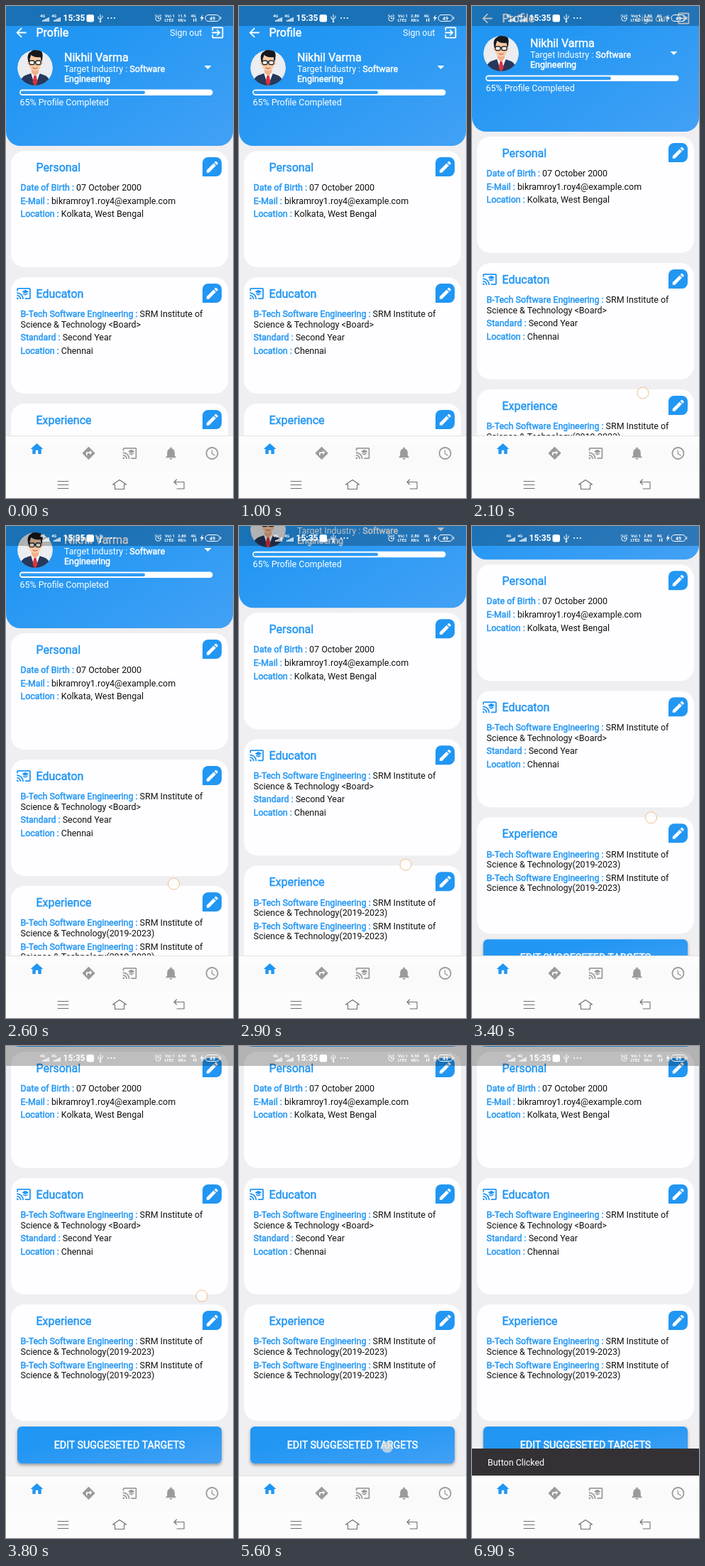
Recreate the animation shown at these times as an HTML page. Size 320 by 693 pixels, loop 7 s.

```html
<!DOCTYPE html>
<html lang="en">
<head>
<meta charset="utf-8">
<title>Profile screen</title>
<style>
html, body { margin: 0; width: 100%; height: 100%; overflow: hidden; background: #efeef0; }
svg { display: block; width: 100vw; height: 100vh; }
text { font: 12.44px Roboto, "Open Sans", sans-serif; fill: #111; white-space: pre; }
.w { fill: #fff; }
.h { font-size: 16px; }
.b { stroke: #2196f3; fill: #2196f3; stroke-width: .45px; }
.w.b, .w .b { stroke: #fff; fill: #fff; }
.tiny { font-size: 5.8px; font-weight: 700; fill: #fff; }
.line { fill: none; stroke-linecap: round; stroke-linejoin: round; }
</style>
</head>
<body>
<svg id="stage" viewBox="0 0 320 693" preserveAspectRatio="none" xmlns="http://www.w3.org/2000/svg"></svg>
<script>
const BLUE = '#2196f3', GREY = '#9b9b9b';
const LOOP = 7000, STEP = 100, MAX_SCROLL = 196, SNACK = 39;

const ICONS = {
  back: 'M20 11H7.83l5.59-5.59L12 4l-8 8 8 8 1.41-1.41L7.83 13H20v-2z',
  exit: 'M10.09 15.59L11.5 17l5-5-5-5-1.41 1.41L12.67 11H3v2h9.67l-2.58 2.59zM19 3H5c-1.11 0-2 .9-2 2v4h2V5h14v14H5v-4H3v4c0 1.1.89 2 2 2h14c1.1 0 2-.9 2-2V5c0-1.1-.9-2-2-2z',
  home: 'M10 20v-6h4v6h5v-8h3L12 3 2 12h3v8z',
  route: 'M21.71 11.29l-9-9c-.39-.39-1.02-.39-1.41 0l-9 9c-.39.39-.39 1.02 0 1.41l9 9c.39.39 1.02.39 1.41 0l9-9c.39-.38.39-1.01 0-1.41zM14 14.5V12h-4v3H8v-4c0-.55.45-1 1-1h5V7.5l3.5 3.5-3.5 3.5z',
  cast: 'M21 3H3c-1.1 0-2 .9-2 2v3h2V5h18v14h-7v2h7c1.1 0 2-.9 2-2V5c0-1.1-.9-2-2-2zM1 18v3h3c0-1.66-1.34-3-3-3zm0-4v2c2.76 0 5 2.24 5 5h2c0-3.87-3.13-7-7-7zm0-4v2c4.97 0 9 4.03 9 9h2c0-6.08-4.93-11-11-11zm10 1.09v2L14.5 15l3.5-1.91v-2L14.5 13 11 11.09zM14.5 6L9 9l5.5 3L20 9l-5.5-3z',
  bell: 'M12 22c1.1 0 2-.9 2-2h-4c0 1.1.89 2 2 2zm6-6v-5c0-3.07-1.64-5.64-4.5-6.32V4c0-.83-.67-1.5-1.5-1.5s-1.5.67-1.5 1.5v.68C7.63 5.36 6 7.92 6 11v5l-2 2v1h16v-1l-2-2z',
  clock: 'M11.99 2C6.47 2 2 6.48 2 12s4.47 10 9.99 10C17.52 22 22 17.52 22 12S17.52 2 11.99 2zM12 20c-4.42 0-8-3.58-8-8s3.58-8 8-8 8 3.58 8 8-3.58 8-8 8zm.5-13H11v6l5.25 3.15.75-1.23-4.5-2.67z',
  pen: 'M3 17.25V21h3.75L17.81 9.94l-3.75-3.75L3 17.25zM20.71 7.04c.39-.39.39-1.02 0-1.41l-2.34-2.34c-.39-.39-1.02-.39-1.41 0l-1.83 1.83 3.75 3.75 1.83-1.83z'
};

const icon = (name, cx, cy, color) =>
  `<path d="${ICONS[name]}" fill="${color}" transform="translate(${cx} ${cy}) scale(.889) translate(-12 -12)"/>`;
const text = (x, y, body, cls = '', more = '') =>
  `<text x="${x}" y="${y}" class="${cls}" ${more}>${body}</text>`;
const bold = s => `<tspan class="b">${s}</tspan>`;
const rect = (x, y, w, h, r, fill, more = '') =>
  `<rect x="${x}" y="${y}" width="${w}" height="${h}" rx="${r}" fill="${fill}" ${more}/>`;

// rows: [offset from the card top, label, value]
function card(top, title, rows, mark) {
  return rect(7, top, 306, 164, 19, '#fefdff') +
    (mark ? icon(mark, 25, top + 23, BLUE) : '') +
    text(42.5, top + 28.5, title, 'h b') +
    `<path d="M285 ${top + 9}h11a8 8 0 0 1 8 8v11a8 8 0 0 1-8 8h-19v-19a8 8 0 0 1 8-8z" fill="${BLUE}"/>` +
    icon('pen', 290.8, top + 22.7, '#fff') +
    rows.map(([dy, label, value]) =>
      text(20.5, top + dy, (label ? bold(label + ' : ') : '') + value)).join('');
}

function avatar() {
  return `<g clip-path="url(#face)">
    <circle cx="41" cy="87" r="25" fill="#ebedf0"/>
    <path d="M19 113q0-14 13-17l9-3 9 3q13 3 13 17z" fill="#26385c"/>
    <path d="M35 94l6 19 7-19-7-4z" fill="#fff"/>
    <path d="M36 86h10v8l-5 5-5-5z" fill="#efb08a"/>
    <path d="M39.5 98h3l2 9-3.500 6-3.500-6z" fill="#d8333f"/>
    <ellipse cx="41" cy="80" rx="9" ry="11.500" fill="#fbc8a2"/>
    <circle cx="31.800" cy="80.500" r="2" fill="#fbc8a2"/><circle cx="50.200" cy="80.500" r="2" fill="#fbc8a2"/>
    <path d="M31.500 79q-3-12 4-15 4-4 10-2 7 1 6 9 0 5-1.500 8l-1.500-7q-8 1-13-3-2 4-2.500 10z" fill="#17181c"/>
    <g fill="#fff" stroke="#222" stroke-width="1.300"><rect x="33" y="77" width="7" height="5.500" rx="2"/><rect x="42" y="77" width="7" height="5.500" rx="2"/><path d="M40 79h2"/></g>
    <path d="M37.500 87q3.500 2.500 7 0" stroke="#b5543f" fill="none"/>
  </g>`;
}

function header() {
  return `<path d="M0 0H320V177a20 20 0 0 1-20 20H20a20 20 0 0 1-20-20z" fill="url(#sky)"/>` +
    icon('back', 21.5, 37.5, '#fff') + text(42.5, 43, 'Profile', 'h w b') +
    text(231, 42, 'Sign out', 'w') + icon('exit', 298.3, 37.5, '#fff') +
    avatar() +
    text(82, 77.5, 'Nikhil Varma', 'h w b') +
    text(82, 92.5, 'Target Industry : ' + bold('Software'), 'w') +
    text(82, 107, bold('Engineering'), 'w') +
    `<path d="M279.500 84h10l-5 5z" fill="#fff"/>` +
    rect(19, 117.5, 272.5, 8.5, 4.2, '#fff') + rect(20.5, 119.5, 175.5, 4.5, 2.2, '#2f9cf3') +
    text(19.5, 139.5, '65% Profile Completed', 'w');
}

const bars = x => text(x, 15.5, '4G', 'tiny') +
  [2, 3, 4, 5, 6].map((h, i) => rect(x + 3 + i * 2.1, 22 - h, 1.4, h, 0, '#fff')).join('');

function statusBar() {
  return rect(0, 0, 320, 28, 0, '#000', 'opacity=".25"') +
    bars(48) + bars(64) +
    text(80.5, 21.2, '15:35', 'w', 'style="font-size:12px;font-weight:600"') +
    rect(113.5, 12, 10.5, 10.5, 2.5, '#fff') +
    `<g class="line" stroke="#fff">
      <path d="M133 12v10M130 15v2q0 1.500 3 2.500M136 14v2q0 1.500-3 2.500"/>
      <circle cx="214.500" cy="17.500" r="3.700"/><path d="M214.500 15.500v2.200h1.800M210 14l2-2M219 14l-2-2"/>
      <rect x="281" y="12.500" width="20" height="9" rx="4.200"/><path d="M302.700 15.500v3"/>
    </g>
    <g fill="#fff"><circle cx="144" cy="17" r="1.100"/><circle cx="148.500" cy="17" r="1.100"/><circle cx="153" cy="17" r="1.100"/>
    <path d="M277.500 12l-4 5.500h2.500l-1.500 4.500 4.500-6h-2.500z"/><circle cx="133" cy="22" r="1.300"/></g>` +
    text(224, 16, 'Vo) 1', 'tiny') + text(223.5, 22.3, 'LTE2', 'tiny') +
    text(248, 16, '', 'tiny', 'id="speed" text-anchor="middle"') +
    text(248, 22.3, 'KB/s', 'tiny', 'text-anchor="middle" style="font-size:5.2px"') +
    text(260.5, 16, '4G', 'tiny') + rect(264, 18, 1.3, 4, 0, '#fff') + rect(267, 17, 1.3, 5, 0, '#fff') +
    text(291, 19.6, '49', 'tiny', 'text-anchor="middle" style="font-size:7px"');
}

function bottomBar() {
  return rect(0, 605.5, 320, 88, 0, '#fcfcfc') + rect(0, 605, 320, 1, 0, '#e3e3e4') +
    rect(0, 618, 320, 38, 0, '#fafafa') +
    icon('home', 43.5, 624, BLUE) +
    ['route', 'cast', 'bell', 'clock'].map((n, i) => icon(n, 116.5 + i * 58, 630, GREY)).join('') +
    `<path class="line" stroke="#6f6f6f" stroke-width="1.100" d="M73 669.500h15M73 674.500h15M73 679.500h15
      M150.500 674l9.500-6.500 9.500 6.500h-3v6.500h-13v-6.500z M240.500 667l-3.500 3.500 3.500 3.500M237 670.500h14v9.500h-10"/>`;
}

const study = 'B-Tech Software Engineering', school = 'SRM Institute of';
const stage = document.getElementById('stage');
stage.innerHTML = `<defs>
  <linearGradient id="sky" x1="0" y1="0" x2="1" y2="1"><stop offset=".3" stop-color="${BLUE}"/><stop offset="1" stop-color="#42a1f5"/></linearGradient>
  <clipPath id="face"><circle cx="41" cy="87" r="25"/></clipPath>
  <filter id="soft" x="-10%" y="-30%" width="120%" height="180%"><feDropShadow dx="0" dy="2.500" stdDeviation="2" flood-opacity=".35"/></filter>
  </defs>` +
  rect(0, 0, 320, 693, 0, '#efeef0') +
  '<g id="page">' + header() +
  card(204, 'Personal', [
    [56, 'Date of Birth', '07 October 2000'],
    [74.7, 'E-Mail', 'bikramroy1.roy4@example.com'],
    [93.4, 'Location', 'Kolkata, West Bengal']]) +
  card(382, 'Educaton', [
    [56.2, study, school], [70.7, '', 'Science &amp; Technology &lt;Board&gt;'],
    [89.3, 'Standard', 'Second Year'], [107.8, 'Location', 'Chennai']], 'cast') +
  card(560, 'Experience', [
    [56.4, study, school], [70.9, '', 'Science &amp; Technology(2019-2023)'],
    [89.5, study, school], [104, '', 'Science &amp; Technology(2019-2023)']]) +
  rect(16, 732, 288, 52, 6, 'url(#sky)', 'filter="url(#soft)"') +
  text(160, 763, 'EDIT SUGGESETED TARGETS', 'w b', 'text-anchor="middle" style="font-size:14.22px"') +
  '</g><circle id="touch" r="8"/>' +
  '<g id="snack">' + rect(0, 567, 320, SNACK, 0, '#333134') + text(22, 591, 'Button Clicked', 'w') + '</g>' +
  bottomBar() + statusBar();

const [page, touch, snack, speed] = ['page', 'touch', 'snack', 'speed'].map(id => document.getElementById(id));

// key points: [time, value]
const SCROLL = [[1800, 0], [1900, 4], [2100, 20], [2600, 53], [3100, 105], [3500, 165], [3800, 206]];
const TOUCH_X = [[1800, 244], [2100, 241], [2600, 236.5], [3100, 238], [3800, 276], [4200, 294]];
const TOUCH_Y = [[1800, 575], [2100, 545], [2600, 504], [3100, 455], [3800, 352], [4200, 324]];

// smooth curve through the points
function curve(pts, t) {
  const last = pts.length - 1;
  if (t <= pts[0][0]) return pts[0][1];
  if (t >= pts[last][0]) return pts[last][1];
  const i = pts.findIndex(p => p[0] > t) - 1;
  const slope = k => {
    const a = pts[Math.max(k - 1, 0)], b = pts[Math.min(k + 1, last)];
    return (b[1] - a[1]) / (b[0] - a[0]);
  };
  const [t0, a] = pts[i], [t1, b] = pts[i + 1], d = t1 - t0, u = (t - t0) / d, v = 1 - u;
  return a * (1 + 2 * u) * v * v + b * u * u * (3 - 2 * u) + d * u * v * (slope(i) * v - slope(i + 1) * u);
}

function draw(time) {
  const t = Math.floor(time % LOOP / STEP) * STEP;
  const scroll = Math.min(MAX_SCROLL, curve(SCROLL, t));
  page.setAttribute('transform', `translate(0 ${-scroll.toFixed(2)})`);

  const drag = t >= 1800 && t < 4400, tap = t >= 5600 && t < 5800;
  touch.style.display = drag || tap ? '' : 'none';
  touch.setAttribute('cx', tap ? 209 : curve(TOUCH_X, t));
  touch.setAttribute('cy', tap ? 565 : curve(TOUCH_Y, t));
  touch.setAttribute('fill', tap ? 'rgba(222,222,222,.75)' : 'rgba(255,255,255,.75)');
  touch.setAttribute('stroke', tap ? 'none' : '#efc08c');

  const u = Math.max(0, Math.min(1, (t - 5650) / 250));
  const rise = 1 - (1 - u) ** 3 * (1 + 2 * u);
  snack.style.display = u > 0 ? '' : 'none';
  snack.setAttribute('transform', `translate(0 ${SNACK * (1 - rise)})`);

  speed.textContent = t < 700 ? '11.5' : t < 3800 ? '2.80' : t < 6800 ? '4.50' : '5.30';
}

function tick() {
  draw(performance.now());
  requestAnimationFrame(tick);
}
tick();
</script>
</body>
</html>
```
